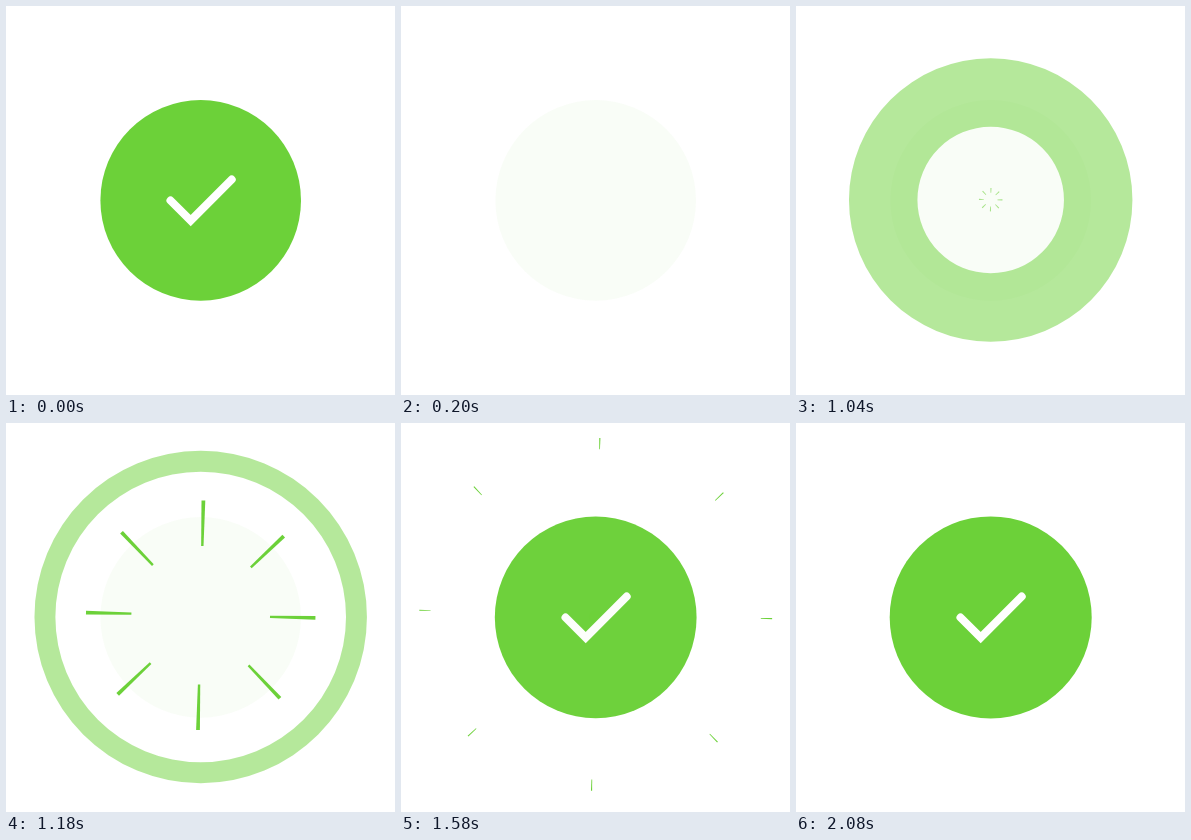
Recreate the animation shown at these times as an HTML page with a canvas. Size 389 px wide and 389 px high, loop 3.6 s.

```html
<!DOCTYPE html>
<html lang="en">
<head>
<meta charset="utf-8">
<title>Success check</title>
<style>
  html, body { margin: 0; width: 100%; height: 100%; overflow: hidden; background: #fff; }
  canvas { display: block; width: 389px; height: 389px; }
</style>
</head>
<body>
<canvas id="stage" width="389" height="389"></canvas>
<script>
const ctx = document.getElementById('stage').getContext('2d');
const LOOP = 3600, STEP = 20;
const GREEN = '#6cd139', HALO = '#c3f0ad';
const CX = 194.7, CY = 194.4;
const RATE = 0.00784;

const clamp = v => Math.min(1, Math.max(0, v));
const smooth = p => p * p * (3 - 2 * p);
// Fast start that settles slowly; t and start in ms.
const settle = (t, start, rate = RATE) => t <= start ? 0 : 1 - Math.exp(-rate * (t - start));

function disc(x, y, r, color, alpha) {
  ctx.globalAlpha = alpha;
  ctx.fillStyle = color;
  ctx.beginPath();
  ctx.arc(x, y, r, 0, Math.PI * 2);
  ctx.fill();
}

function donut(outer, hole, color, alpha) {
  if (outer <= hole) return;
  ctx.globalAlpha = alpha;
  ctx.fillStyle = color;
  ctx.beginPath();
  ctx.arc(CX, 194, outer, 0, Math.PI * 2);
  ctx.arc(CX, 194, hole, 0, Math.PI * 2, true);
  ctx.fill();
}

function badge(radius, scale, alpha) {
  ctx.save();
  ctx.translate(CX, 197.3);
  ctx.scale(scale, scale);
  ctx.translate(-CX, -197.3);
  disc(CX, CY, radius, GREEN, alpha);
  ctx.strokeStyle = '#fff';
  ctx.lineWidth = 8;
  ctx.lineCap = 'round';
  ctx.lineJoin = 'miter';
  ctx.beginPath();
  ctx.moveTo(164.5, 194.5);
  ctx.lineTo(184.7, 214.6);
  ctx.lineTo(225.7, 173.5);
  ctx.stroke();
  ctx.restore();
}

function rays(t) {
  const outer = 181 * settle(t, 1030, 0.0067);
  const u = Math.max(0, (t - 1040) / 320);
  const ratio = 0.58 + 0.125 * u * u;
  if (outer <= 0 || ratio >= 1) return;
  const inner = outer * ratio;
  const thin = clamp((1 - ratio) / 0.295);
  const wide = (0.4 + 2.1 * outer / 161) * thin;
  const narrow = wide * 0.62;
  ctx.save();
  ctx.globalAlpha = clamp(0.6 + (t - 1040) / 100);
  ctx.fillStyle = GREEN;
  ctx.translate(194.7, 193.8 - 2.2 * outer / 161);
  ctx.rotate(1.35 * Math.PI / 180);
  for (let i = 0; i < 8; i++) {
    ctx.beginPath();
    ctx.moveTo(inner, -narrow);
    ctx.lineTo(outer, -wide);
    ctx.lineTo(outer, wide);
    ctx.lineTo(inner, narrow);
    ctx.fill();
    ctx.rotate(Math.PI / 4);
  }
  ctx.restore();
}

function draw(t) {
  ctx.globalAlpha = 1;
  ctx.fillStyle = '#fff';
  ctx.fillRect(0, 0, 389, 389);

  if (t < 200) {
    badge(100.3, 1, 1 - 0.96 * t / 200);
    return;
  }
  if (t < 1600) disc(CX, CY, 100.3, GREEN, 0.04);

  // First burst: a ring with a hole that catches up.
  if (t < 1500) {
    donut(178.5 * settle(t, 838.5), 181.4 * settle(t, 974), GREEN, 0.5);
  }

  // Second burst behind the badge.
  if (t < 2080) {
    donut(183 * settle(t, 1575), 190.6 * settle(t, 1711), HALO, 1);
  }

  rays(t);

  const grow = clamp((t - 1296) / 290);
  if (grow > 0) badge(101, smooth(grow), grow);
}

const origin = performance.now();
function tick() {
  const t = (performance.now() - origin) % LOOP;
  draw(Math.floor(t / STEP) * STEP);
  requestAnimationFrame(tick);
}
tick();
</script>
</body>
</html>
```
